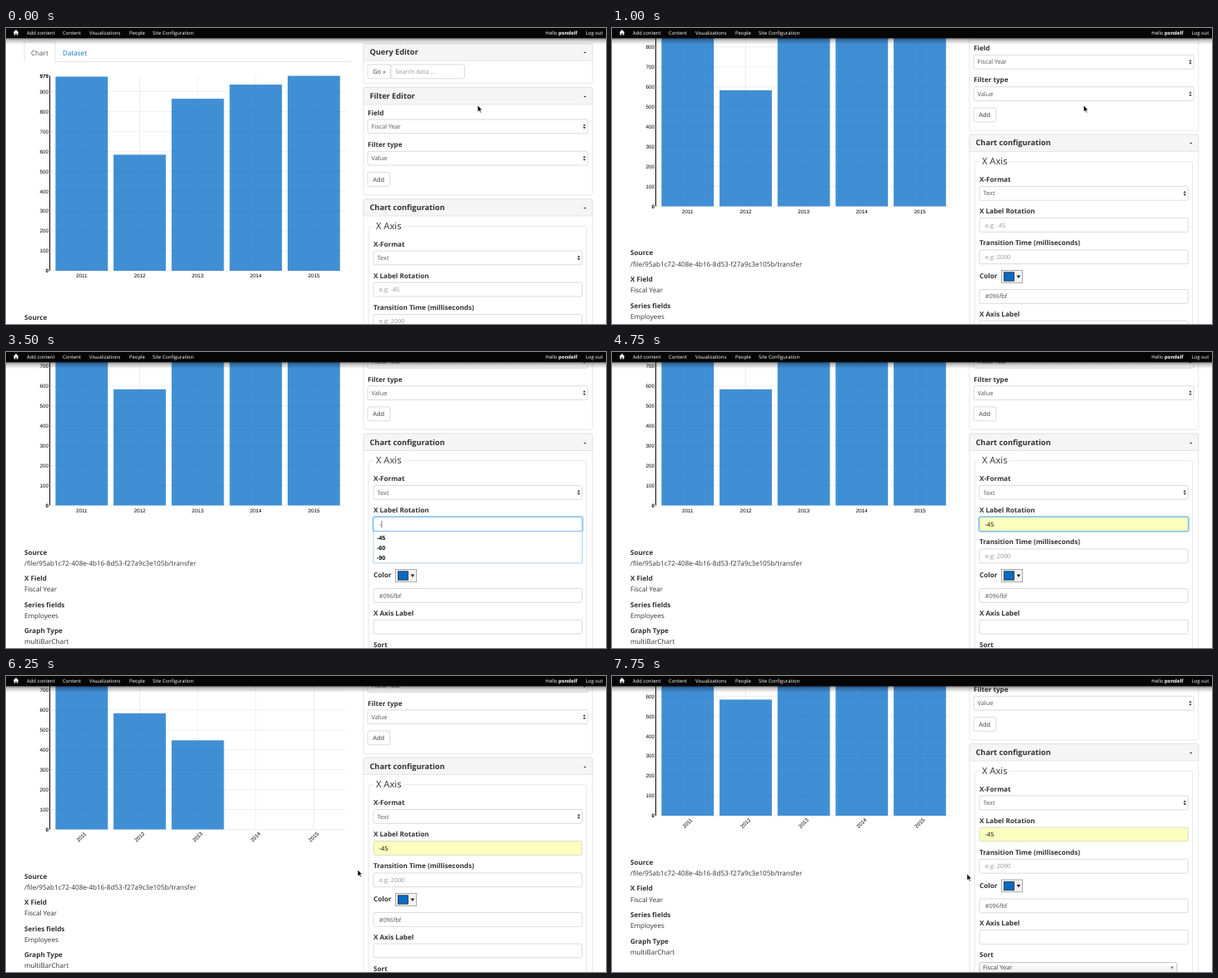
Write an HTML page that moves like this. It is 720 px wide and 356 px high and loops after 8000 ms.

```html
<!DOCTYPE html>
<html lang="en">
<head>
<meta charset="utf-8">
<title>Chart settings</title>
<style>
html, body { margin: 0; width: 100%; height: 100%; overflow: hidden; background: #fff; }
svg { display: block; width: 720px; height: 356px; }
text { font-family: "Open Sans", sans-serif; font-size: 8.1px; fill: #333; text-rendering: geometricPrecision; white-space: pre; }
.b { font-weight: 700; }
.head { font-size: 9.2px; font-weight: 700; }
.legend { font-size: 11.2px; }
.field { font-size: 7.3px; fill: #555; }
.hint { font-size: 7.3px; fill: #999; }
.nav { font-size: 5.9px; fill: #fff; }
.tick { font-family: "Liberation Sans", Arial, sans-serif; font-size: 6.3px; fill: #000; }
.opt { font-family: "Liberation Sans", Arial, sans-serif; font-size: 7.1px; font-weight: 700; fill: #000; }
.link { fill: #0b76b8; }
</style>
</head>
<body>
<svg id="stage" viewBox="0 0 720 356" xmlns="http://www.w3.org/2000/svg"></svg>
<script>
const LOOP = 8000;
const BASE = 292, UNIT = 0.2395;
const STEP = 69.65, BAR_W = 62.8, BAR_X = 59.4;
const VALUES = [975, 583, 864, 935, 979];

// Timeline, in ms
const FOCUS = 2900, TYPED = 3250, PREVIEW = 4100, PICKED = 4500, BLUR = 5350;
const REDRAW = 5510, GROW = 500, STAGGER = 244;

const clamp = u => Math.max(0, Math.min(1, u));
const span = (t, a, b) => clamp((t - a) / (b - a));
const easeOut = u => 1 - (1 - u) ** 2;
const smooth = u => u * u * (3 - 2 * u);
const cubic = u => u < 0.5 ? 4 * u ** 3 : 1 - 4 * (1 - u) ** 3;

const text = (x, y, s, cls = "", extra = "") =>
  `<text x="${x}" y="${y}" class="${cls}" ${extra}>${s}</text>`;
const rect = (x, y, w, h, fill, stroke = "none", r = 0, extra = "") =>
  `<rect x="${x}" y="${y}" width="${w}" height="${h}" rx="${r}" fill="${fill}" stroke="${stroke}" stroke-width=".7" ${extra}/>`;
const line = (x1, y1, x2, y2, color, w = 0.7) =>
  `<line x1="${x1}" y1="${y1}" x2="${x2}" y2="${y2}" stroke="${color}" stroke-width="${w}"/>`;
const path = (d, fill, extra = "") => `<path d="${d}" fill="${fill}" ${extra}/>`;

const panel = (y, h, title) =>
  rect(429, y, 274.7, h, "#fff", "#ddd", 2) +
  path(`M429 ${y + 20.3}V${y + 2}q0-2 2-2H701.7q2 0 2 2V${y + 20.3}Z`, "#f5f5f5", 'stroke="#ddd" stroke-width=".7"') +
  text(436.5, y + 13.3, title, "head") + text(693.3, y + 13.3, "-", "head");

const box = (x, y, w, h = 16.8) => rect(x, y, w, h, "#fff", "#ccc", 2);

const select = (x, y, w, value) => {
  const ax = x + w - 4, cy = y + 8.4;
  return box(x, y, w) + text(x + 4.6, y + 11, value, "field") +
    path(`M${ax - 1.7} ${cy - 0.7}h3.4l-1.7-2.3zM${ax - 1.7} ${cy + 0.7}h3.4l-1.7 2.3z`, "#333");
};

const input = (y, value, cls) => box(441, y, 250.3) + text(447.7, y + 11, value, cls);

function chart() {
  let grid = "", ticks = "", bars = "", flat = "", tilted = "";
  for (let v = 0; v <= 900; v += 100) {
    const y = BASE - v * UNIT;
    grid += line(53, y, 407, y, "#e4e4e4", 0.6);
    ticks += text(51, y + 2.3, v, "tick" + (v ? "" : " b"), 'text-anchor="end"');
  }
  ticks += text(51, BASE - 979 * UNIT + 2.3, 979, "tick b", 'text-anchor="end"');
  VALUES.forEach((v, i) => {
    const x = BAR_X + i * STEP, mid = x + BAR_W / 2, year = 2011 + i;
    grid += line(mid, 57.5, mid, BASE, "#e4e4e4", 0.6);
    bars += `<rect class="bar" x="${x}" width="${BAR_W}" fill="#006ac6" fill-opacity=".75"/>`;
    flat += text(mid, 300.3, year, "tick", 'text-anchor="middle"');
    tilted += text(0, 2.2, year, "tick", `text-anchor="middle" transform="translate(${mid - 0.3} 301) rotate(-45)"`);
  });
  return `<g id="axes">${grid}${ticks}<g id="flat">${flat}</g><g id="tilted">${tilted}</g></g>` +
    `<g id="bars">${bars}</g>` + line(52.6, 57.5, 52.6, BASE, "#000", 1);
}

function leftSide() {
  const facts = [
    [351, "Source", "/file/95ab1c72-408e-4b16-8d53-f27a9c3e105b/transfer"],
    [382.4, "X Field", "Fiscal Year"],
    [414.1, "Series fields", "Employees"],
    [445.8, "Graph Type", "multiBarChart"]
  ];
  return path("M22 40.5V16H59V40.5H414", "none", 'stroke="#ddd" stroke-width=".8"') +
    text(30, 32.5, "Chart", "", 'style="fill:#555"') + text(68, 32.5, "Dataset", "link") + chart() +
    facts.map(([y, k, v]) => text(22, y, k, "b") + text(22, y + 13.1, v)).join("");
}

function rightSide() {
  return panel(18.9, 47.8, "Query Editor") +
    box(434, 44, 28) + text(440.3, 55.2, "Go »", "field", 'style="fill:#333"') +
    box(462, 44, 88.3) + text(467.3, 55.2, "Search data ...", "hint") +

    panel(71.5, 129.4, "Filter Editor") +
    text(434, 104.8, "Field", "b") + select(434, 110, 264, "Fiscal Year") +
    text(434, 143, "Filter type", "b") + select(434, 148.3, 264, "Value") +
    box(434, 173.5, 26.8) + text(440.3, 184.8, "Add", "field", 'style="fill:#333"') +

    panel(205.7, 400, "Chart configuration") +
    rect(435.3, 238.3, 261.4, 350, "none", "#ddd", 2) + rect(441, 236, 35, 5, "#fff") +
    text(444, 241.6, "X Axis", "legend") +
    text(441, 262.8, "X-Format", "b") + select(441, 268, 250.3, "Text") +
    text(441, 300.6, "X Label Rotation", "b") +
    rect(440.2, 305.4, 251.9, 18.2, "none", "#a9d5f5", 2.5, 'id="glow" style="stroke-width:2"') +
    rect(441, 306.1, 250.3, 16.8, "#fff", "#ccc", 2, 'id="rot"') +
    text(447.7, 317.1, "", "hint", 'id="rotText"') +
    line(450.9, 310.5, 450.9, 319, "#222", 0.6).replace("<line", '<line id="caret"') +
    text(441, 338.9, "Transition Time (milliseconds)", "b") + input(344.4, "e.g: 2000", "hint") +
    text(441, 378.6, "Color", "b") +
    rect(467.5, 369, 25.2, 14.8, "#f2f2f2", "#888") +
    rect(470.3, 371.3, 12.2, 10.4, "#0a6bc2", "#222") +
    path("M485.6 375h4.6l-2.3 3.6z", "#222") +
    input(392, "#096fbf", "field") +
    text(441, 424.4, "X Axis Label", "b") + input(429.6, "", "field") +
    text(441, 462.3, "Sort", "b") +
    rect(441, 468.6, 237, 13, "url(#chosen)", "#aaa", 2) +
    text(445, 477.3, "Fiscal Year", "field", 'style="fill:#444"') +
    path("M670.3 473.4h3.6l-1.8 3z", "#777") +
    `<g id="menu">${rect(441, 323.4, 250.6, 38, "#fff", "#8fc3ea")}` +
    rect(441.4, 324.4, 249.8, 12, "#d6e6f7", "none", 0, 'id="hover"') +
    [45, 60, 90].map((n, i) => text(445, 333 + i * 12.1, "-" + n, "opt")).join("") + "</g>";
}

function navBar() {
  const items = [[25, "Add content"], [68, "Content"], [100, "Visualizations"], [148, "People"], [176, "Site Configuration"]];
  return rect(0, 12, 720, 8, "url(#shade)") + rect(0, 0, 720, 12.3, "#060606") +
    path("M8.6 5.4L12 2l3.4 3.4h-1V8.4h-1.7V6.2h-1.4v2.2H9.6v-3z", "#fff") +
    items.map(([x, s]) => text(x, 7.7, s, "nav")).join("") +
    text(647.3, 7.7, 'Hello <tspan font-weight="700">pondelf</tspan>', "nav") +
    text(695.7, 7.7, "Log out", "nav");
}

const fade = (id, stops) => `<linearGradient id="${id}" x2="0" y2="1">` +
  stops.map(([o, c, a]) => `<stop offset="${o}" stop-color="${c}" stop-opacity="${a}"/>`).join("") + "</linearGradient>";

document.getElementById("stage").innerHTML =
  "<defs>" + fade("shade", [[0, "#000", 0.5], [0.4, "#000", 0.2], [1, "#000", 0]]) +
  fade("chosen", [[0, "#fff", 1], [1, "#ececec", 1]]) + "</defs>" +
  rect(0, 0, 720, 356, "#fff") +
  `<g id="page">${leftSide()}${rightSide()}</g>` + navBar() +
  `<g id="cursor">${path("M0 0V7.8L1.8 6.2 3 9 4.3 8.4 3.1 5.7H5.5Z", "#000", 'stroke="#fff" stroke-width=".6"')}</g>`;

const el = id => document.getElementById(id);
const page = el("page"), axes = el("axes"), barGroup = el("bars"), cursor = el("cursor");
const rot = el("rot"), rotText = el("rotText");
const bars = [...document.querySelectorAll(".bar")];
const show = (node, on) => node.setAttribute("visibility", on ? "visible" : "hidden");

function drawChart(t) {
  const fresh = t >= REDRAW;
  const alpha = fresh ? cubic(span(t, REDRAW, REDRAW + GROW)) : 1;
  axes.setAttribute("opacity", alpha);
  barGroup.setAttribute("opacity", alpha ** 3);
  show(el("flat"), !fresh);
  show(el("tilted"), fresh);
  bars.forEach((bar, i) => {
    const start = REDRAW + i * STAGGER;
    const h = VALUES[i] * UNIT * (fresh ? cubic(span(t, start, start + GROW)) : 1);
    bar.setAttribute("y", BASE - h);
    bar.setAttribute("height", h);
  });
}

function drawField(t) {
  const focused = t >= FOCUS && t < BLUR, filled = t >= PREVIEW, typed = t >= TYPED;
  show(el("glow"), focused);
  rot.setAttribute("stroke", focused ? "#66afe9" : "#ccc");
  rot.setAttribute("fill", filled ? "#faffbd" : "#fff");
  rotText.textContent = filled ? "-45" : typed ? "-" : "e.g: -45";
  rotText.style.fill = filled ? "#000" : typed ? "#555" : "#999";
  show(el("caret"), typed && !filled);
  show(el("menu"), typed && t < PICKED);
  show(el("hover"), filled && t < PICKED);
}

function drawCursor(t) {
  const move = (a, b, from, to) => {
    const u = smooth(span(t, a, b));
    return from.map((v, i) => v + (to[i] - v) * u);
  };
  const pos = t < FOCUS ? move(2150, 2750, [566, 93], [495, 207])
    : t < 7000 ? move(5000, 5480, [470, 222], [422, 233])
    : move(7480, 7720, [422, 233], [426, 238]);
  cursor.setAttribute("transform", `translate(${pos})`);
  show(cursor, t < FOCUS || t >= 4950);
}

function draw(t) {
  const scroll = 107.5 * easeOut(span(t, 230, 1864)) + 16.5 * smooth(span(t, 6950, 7480));
  page.setAttribute("transform", `translate(0 ${-scroll})`);
  drawChart(t);
  drawField(t);
  drawCursor(t);
}

const began = performance.now();
function tick() {
  draw((performance.now() - began) % LOOP);
  requestAnimationFrame(tick);
}
tick();
</script>
</body>
</html>
```
